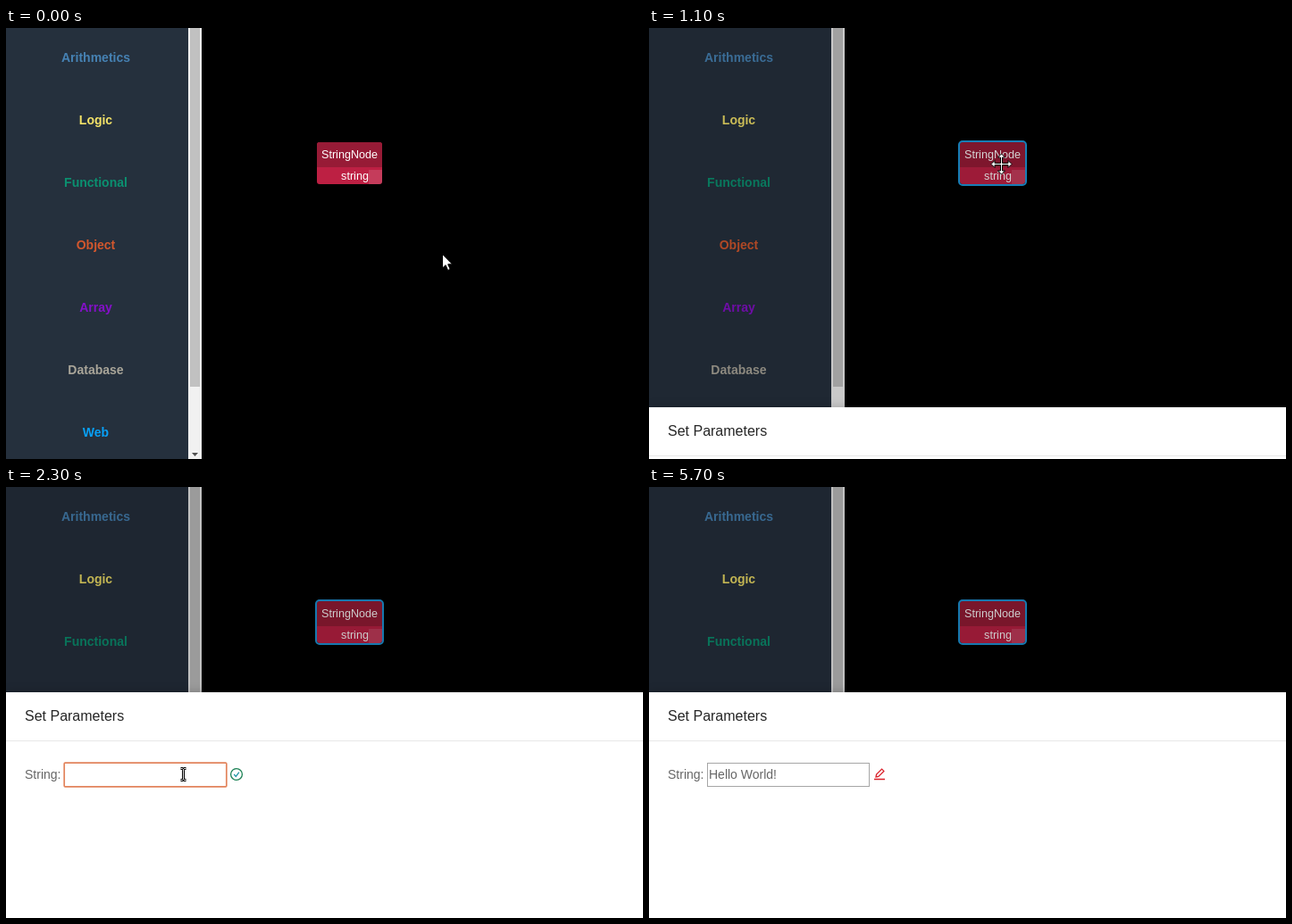
Recreate the animation shown at these times as an HTML page. Size 713 by 483 pixels, loop 5800 ms.

```html
<!DOCTYPE html>
<html lang="en">
<head>
<meta charset="utf-8">
<title>Set node parameters</title>
<style>
  html, body { margin: 0; width: 100%; height: 100%; overflow: hidden; background: #000; }
  svg { display: block; font-family: "Liberation Sans", Arial, sans-serif; }
  #menu { font-size: 14px; font-weight: bold; text-anchor: middle; }
  #node text { font-size: 12.6px; fill: #fff; text-anchor: middle; }
  #panel { font-size: 14px; fill: #666; }
  #sheet { filter: drop-shadow(0 -2px 4px rgba(0, 0, 0, .15)); }
  #typed { white-space: pre; }
</style>
</head>
<body>
<svg width="713" height="483" viewBox="0 0 713 483">
  <rect width="713" height="483"/>
  <rect width="204" height="483" fill="#25303d"/>
  <g id="menu"></g>

  <rect x="204" width="15" height="483" fill="#f1f1f1"/>
  <rect x="206" width="11" height="402" fill="#c1c1c1"/>
  <path d="M208 476h7l-3.5 4z" fill="#505050"/>

  <g id="node">
    <rect x="348" y="128" width="73" height="47" rx="3" fill="#bd2043"/>
    <path d="M348 156v-25q0-3 3-3h67q3 0 3 3v25z" fill="#971b36"/>
    <path d="M406 159h15v13q0 3-3 3h-12z" fill="#fff" opacity=".13"/>
    <text x="384.5" y="146">StringNode</text>
    <text x="390.5" y="170">string</text>
    <rect id="selection" x="347" y="127" width="75" height="49" rx="4" fill="none" stroke="#1c97db" stroke-width="2"/>
  </g>

  <rect id="mask" width="713" height="483"/>

  <g id="panel">
    <rect id="sheet" width="713" height="483" fill="#fff"/>
    <text x="21" y="32" font-size="16" fill="#262626">Set Parameters</text>
    <rect y="54" width="713" height="1" fill="#e8e8e8"/>
    <text x="21" y="97">String:</text>
    <rect id="field" x="65.5" y="79.5" width="181" height="26" fill="#fff" stroke="#a6a6a6"/>
    <rect id="focus" x="65.2" y="79.2" width="181.6" height="26.6" rx="1" fill="none" stroke="#e2845c" stroke-width="1.7"/>
    <text id="typed" x="67" y="97"></text>
    <rect id="caret" y="84" width="1" height="16" fill="#333"/>
    <g id="saved" fill="none" stroke-width="1.3">
      <circle cx="258" cy="92" r="6.4" stroke="#1e8256"/>
      <path d="M255.2 92l2.1 2.4 3.6-4.8" stroke="#2196a6"/>
    </g>
    <g id="editing" fill="none" stroke="#d9202a" stroke-width="1.3">
      <path d="M252 97.5h12M254 95l.6-2.9 6-6 2.3 2.3-6 6z"/>
    </g>
  </g>

  <g id="cursor" stroke-linejoin="round">
    <path id="arrow" d="M.5.5V16l3.6-3.3L6.6 18.5l2.6-1.1L6.7 11.8H11.5z" fill="#fff" stroke="#000"/>
    <path id="move" fill="#fff" stroke="#000"
      d="M0-11.5l4 4H1V-1H7.5V-4l4 4-4 4V1H1V7.5H4l-4 4-4-4h3V1h-6.5v3l-4-4 4-4v3H-1v-6.5h-3z"/>
    <g id="beam" fill="none">
      <path d="M-3-6.5h2L0-5.5l1-1h2M-3 6.5h2L0 5.5l1 1h2M0-5.5v11" stroke="#000" stroke-width="3"/>
      <path d="M-3-6.5h2L0-5.5l1-1h2M-3 6.5h2L0 5.5l1 1h2M0-5.5v11" stroke="#fff" stroke-width=".9"/>
    </g>
  </g>
</svg>
<script>
const LOOP = 5800, STEP = 100, MESSAGE = "Hello World!";
const el = id => document.getElementById(id);
const show = (id, visible) => el(id).setAttribute("display", visible ? "inline" : "none");

const categories = {
  Arithmetics: "#4682b4", Logic: "#f3e268", Functional: "#0b9070", Object: "#d2572d",
  Array: "#8410c8", Database: "#a9a599", Web: "#08a0f7"
};
el("menu").innerHTML = Object.entries(categories)
  .map(([name, color], i) => `<text x="100.5" y="${38 + 70 * i}" fill="${color}">${name}</text>`)
  .join("");

// Each track lists [start time, value...]; a value holds until the next entry.
const pointer = [
  [0, "arrow", 488, 253], [300, "arrow", 484, 248], [400, "arrow", 469, 232],
  [500, "arrow", 445, 207], [600, "arrow", 421, 181], [700, "move", 401, 160],
  [800, "move", 394.5, 152.5], [1200, "arrow", 384, 175], [1300, "arrow", 320, 262],
  [1400, "arrow", 251, 344], [1600, "arrow", 236, 337], [1700, "beam", 211, 326],
  [1800, "beam", 198.5, 322], [2400, "none", 0, 0], [4700, "arrow", 244, 321],
  [4900, "arrow", 557, 321], [5200, "arrow", 330, 195], [5300, "arrow", 104, 69],
  [5500, "arrow", 112, 45], [5600, "arrow", 120, 29], [5700, "none", 0, 0]
];
const typing = [
  [0, 0], [2400, 1], [2500, 2], [2700, 3], [2800, 4], [3100, 6],
  [3500, 7], [3600, 8], [3700, 10], [3800, 11], [4100, 12]
];
const drawer = [[0, 490, 0], [1000, 480, .03], [1100, 425, .17], [1200, 230, .2]];
const at = (track, t) => track.findLast(key => key[0] <= t).slice(1);

function draw(t) {
  const [top, shade] = at(drawer, t);
  el("panel").setAttribute("transform", `translate(0 ${top})`);
  show("panel", t >= 1000);
  el("mask").setAttribute("opacity", shade);
  show("selection", t >= 1000);

  const [count] = at(typing, t);
  el("typed").textContent = MESSAGE.slice(0, count);
  const textWidth = count ? el("typed").getComputedTextLength() : 0;
  el("caret").setAttribute("x", Math.round(67 + textWidth));
  show("caret", t >= 1800 && t < 2300 || t >= 2400 && t < 4700);
  show("focus", t >= 1800 && t < 5500);
  show("saved", count === 0);
  show("editing", count > 0);

  const [shape, x, y] = at(pointer, t);
  el("cursor").setAttribute("transform", `translate(${x} ${y})`);
  for (const id of ["arrow", "move", "beam"]) show(id, id === shape);
}

const start = performance.now();
function tick() {
  const t = (performance.now() - start) % LOOP;
  draw(Math.floor(t / STEP) * STEP);
  requestAnimationFrame(tick);
}
tick();
</script>
</body>
</html>
```
